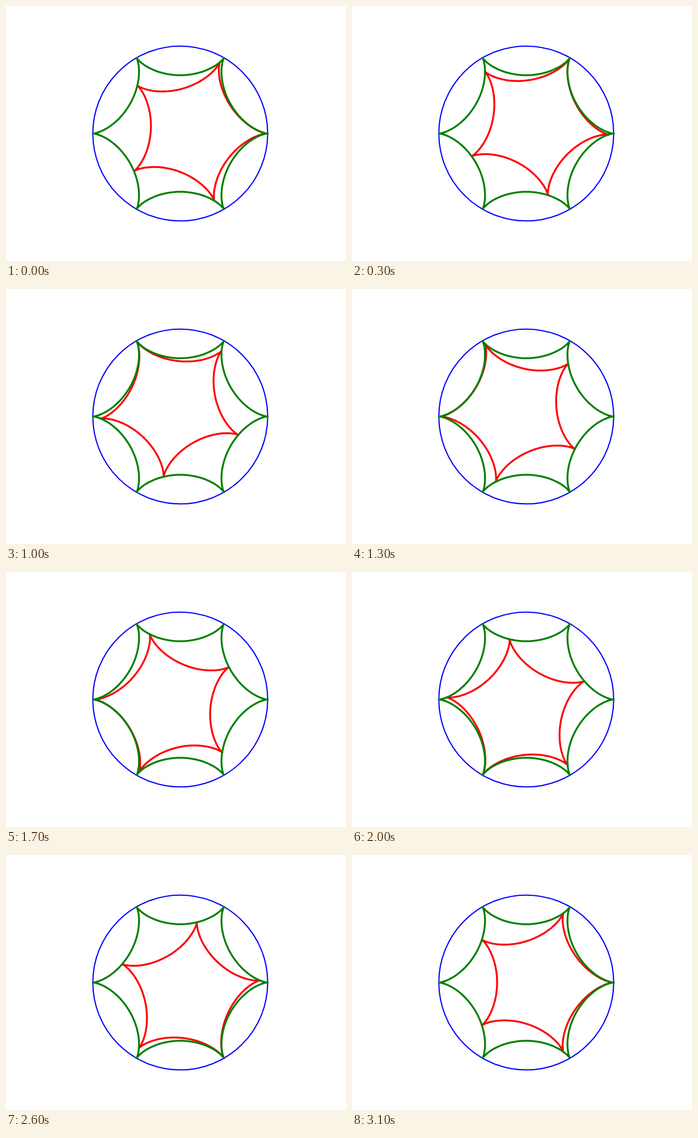
Write an HTML page that moves like this. It is 600 px wide and 450 px high and loops after 3.2 s.

```html
<!DOCTYPE html>
<html lang="en">
<head>
<meta charset="utf-8">
<title>Rolling hypocycloids</title>
<style>
  html, body { margin: 0; width: 100%; height: 100%; overflow: hidden; background: #fff; }
  svg { display: block; width: 100%; height: 100%; }
  path, circle { fill: none; }
  path { stroke-width: 3.3; stroke-linecap: square; stroke-linejoin: round; }
</style>
</head>
<body>
<svg viewBox="0 0 600 450">
  <circle id="rim" stroke="#00f" stroke-width="2.08"/>
  <path id="inner" stroke="#f00"/>
  <path id="outer" stroke="#008000"/>
</svg>
<script>
const CX = 307.5, CY = 225, R = 180 * 6 / 7, r = R / 6;
const STEPS = 32, STEP_MS = 100, TAU = 2 * Math.PI;
const el = id => document.getElementById(id);

// Hypocycloid with n cusps, centred at (x, y); angles run counter-clockwise
function hypocycloid(n, x, y, turn) {
  const pts = [], count = n * 60;
  for (let i = 0; i <= count; i++) {
    const t = TAU * i / count, a = t + turn, b = (1 - n) * t + turn;
    const px = x + r * ((n - 1) * Math.cos(a) + Math.cos(b));
    const py = y - r * ((n - 1) * Math.sin(a) + Math.sin(b));
    pts.push(px.toFixed(3) + ' ' + py.toFixed(3));
  }
  return 'M' + pts.join('L');
}

// The five-cusped curve rolls inside the six-cusped one in discrete steps
function draw(ms) {
  const step = Math.floor(ms / STEP_MS) % STEPS;
  const phi = TAU * (step + 1) / STEPS;
  el('inner').setAttribute('d',
    hypocycloid(5, CX + r * Math.cos(phi), CY - r * Math.sin(phi), -phi / 5));
}

for (const [k, v] of Object.entries({ cx: CX, cy: CY, r: R })) el('rim').setAttribute(k, v);
el('outer').setAttribute('d', hypocycloid(6, CX, CY, 0));

let start;
function tick(now) {
  start ??= now;
  draw(Math.max(0, now - start));
  requestAnimationFrame(tick);
}
draw(0);
requestAnimationFrame(tick);
</script>
</body>
</html>
```
